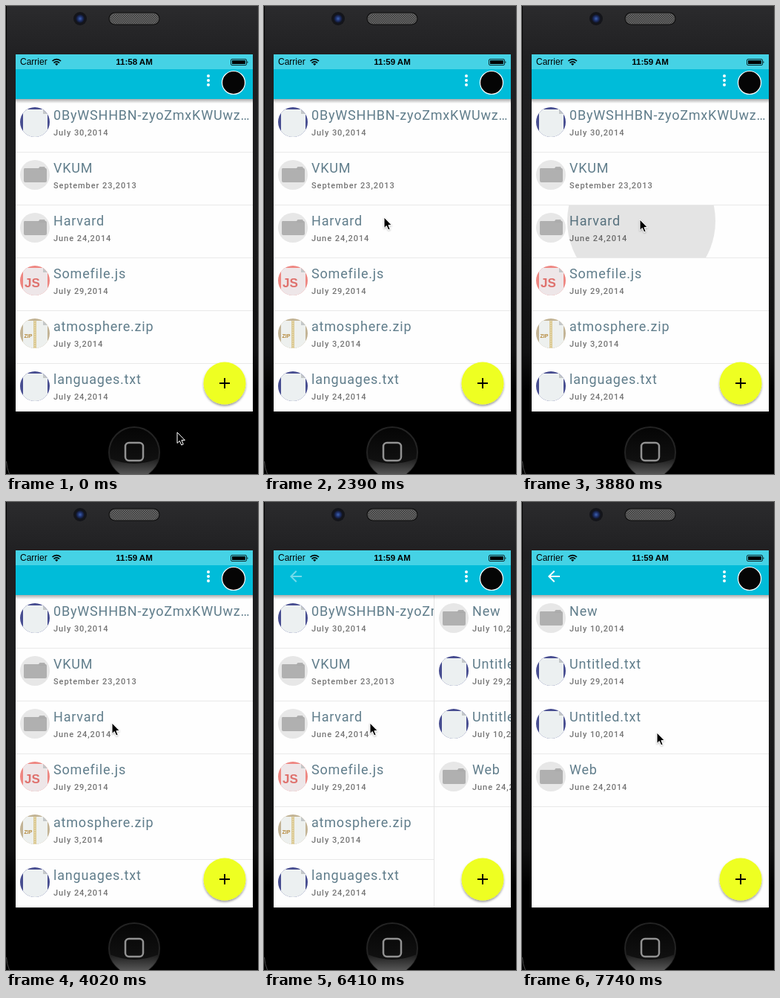
Animation of 340 by 629 pixels, one loop 8 s. Source, as an HTML page:

```html
<!DOCTYPE html>
<html lang="en">
<head>
<meta charset="utf-8">
<title>File browser</title>
<style>
  html, body { margin: 0; width: 100%; height: 100%; overflow: hidden; background: #000; }
  svg { display: block; width: 100%; height: 100%; }
  .status { font: 12px "Liberation Sans", Arial, sans-serif; }
  .clock { font-size: 11.5px; font-weight: 700; text-anchor: middle; }
  .title { font: 18px Roboto, sans-serif; letter-spacing: .8px; fill: #607d8b; }
  .date { font: 500 11px Roboto, sans-serif; letter-spacing: .95px; fill: #757575; }
  .badge { font-family: "Liberation Sans", Arial, sans-serif; font-weight: 700; }
</style>
</head>
<body>
<svg viewBox="0 0 340 629">
  <defs>
    <linearGradient id="body" x1="0" y1="0" x2="0" y2="1">
      <stop offset="0" stop-color="#2b2b2d"/>
      <stop offset=".11" stop-color="#202022"/>
      <stop offset=".5" stop-color="#1a1a1b"/>
      <stop offset=".74" stop-color="#101011"/>
      <stop offset=".82" stop-color="#000"/>
    </linearGradient>
    <linearGradient id="home" x1="0" y1="0" x2="0" y2="1">
      <stop offset="0" stop-color="#050505"/>
      <stop offset="1" stop-color="#161616"/>
    </linearGradient>
    <linearGradient id="gloss" x1="0" y1="0" x2="0" y2="1">
      <stop offset="0" stop-color="#1c1c1c"/>
      <stop offset="1" stop-color="#555"/>
    </linearGradient>
    <linearGradient id="drop" x1="0" y1="0" x2="0" y2="1">
      <stop offset="0" stop-color="#000" stop-opacity=".32"/>
      <stop offset="1" stop-color="#000" stop-opacity="0"/>
    </linearGradient>
    <radialGradient id="lens">
      <stop offset="0" stop-color="#3c62b4"/>
      <stop offset=".55" stop-color="#1d2d62"/>
      <stop offset="1" stop-color="#10131f"/>
    </radialGradient>
    <pattern id="mesh" width="3" height="3" patternUnits="userSpaceOnUse">
      <path fill="#777" d="M0 0h3v3H0z"/>
      <path fill="#303030" d="M0 0h1.5v1.5H0zM1.5 1.5H3V3H1.5z"/>
    </pattern>
    <filter id="soft" x="-30%" y="-30%" width="160%" height="160%">
      <feDropShadow dx="0" dy="2" stdDeviation="1.8" flood-opacity=".4"/>
    </filter>
    <filter id="lift" x="-50%" y="-50%" width="200%" height="200%">
      <feDropShadow dx="0" dy="1" stdDeviation=".8" flood-opacity=".3"/>
    </filter>
    <clipPath id="screen"><path d="M13 65h320v480H13z"/></clipPath>
    <clipPath id="disc"><circle r="20"/></clipPath>
    <clipPath id="thirdRow"><path d="M13 268h320v70H13z"/></clipPath>
  </defs>

  <path fill="url(#body)" d="M0 0h340v629H0z"/>
  <path fill="#000" d="M0 0h1v629H0z"/>
  <path fill="#000" d="M0 545h340v84H0z"/>
  <path fill="none" stroke="#4a4a4a" d="M.5 612q.5 9 4 17"/>

  <circle cx="100" cy="17" r="9" fill="#14151a"/>
  <circle cx="100" cy="17" r="6" fill="url(#lens)"/>
  <rect x="138.500" y="8.500" width="69" height="17" rx="8.500" fill="#0c0c0c"/>
  <rect x="140" y="10" width="66" height="14" rx="7" fill="url(#mesh)" stroke="#555"/>

  <circle cx="173" cy="600" r="34" fill="url(#home)" stroke="#232323" stroke-width="2"/>
  <path fill="url(#gloss)" d="M140 608Q173 622 206 608A34 34 0 0 1 194 627L192 629H154L152 627A34 34 0 0 1 140 608z"/>
  <rect x="161" y="587" width="24" height="24" rx="5" fill="none" stroke="#929292" stroke-width="2.500"/>

  <g clip-path="url(#screen)">
    <path fill="#fefefe" d="M13 65h320v480H13z"/>
    <g id="root"></g>
    <circle id="ripple" cx="161" cy="289" clip-path="url(#thirdRow)" opacity=".1"/>
    <g id="folder">
      <path fill="#fefefe" d="M13 125h320v420H13z"/>
      <path id="edge" fill="#e4e4e4" d="M12 125h1v420h-1z"/>
    </g>

    <path fill="url(#drop)" d="M13 125h320v6H13z"/>
    <path fill="#00bcd9" d="M13 85h320v40H13z"/>
    <path fill="#45d2e5" d="M13 65h320v20H13z"/>

    <text class="status" x="19" y="79">Carrier</text>
    <g fill="none" stroke="#000" stroke-width="1.700">
      <path d="M62.500 74a8 8 0 0 1 11.500 0M64.500 76.500a5 5 0 0 1 7.500 0"/>
      <path fill="#000" stroke="none" d="M66 77.800q2.200-1.600 4.400 0L68.200 80z"/>
    </g>
    <text id="clock" class="status clock" x="173" y="79"></text>
    <rect x="303.500" y="71.500" width="21" height="8" rx="1.500" fill="none" stroke="#000" stroke-width=".8"/>
    <path d="M305 73h18v5h-18zM325.500 74q2 1.500 0 3z"/>

    <path id="back" fill="#fff" transform="translate(31 88)" d="M20 11H7.830l5.590-5.590L12 4l-8 8 8 8 1.410-1.410L7.830 13H20z"/>
    <g fill="#fff">
      <circle cx="273" cy="94" r="2"/><circle cx="273" cy="100" r="2"/><circle cx="273" cy="106" r="2"/>
    </g>
    <circle cx="307" cy="103" r="15.500" fill="#050505" stroke="#fff" stroke-width="1.200"/>

    <circle cx="295" cy="507" r="28.500" fill="#eeff22" filter="url(#soft)"/>
    <path d="M294 500h2v6h6v2h-6v6h-2v-6h-6v-2h6z"/>
  </g>

  <path id="cursor" filter="url(#lift)" stroke="#fff" stroke-linejoin="round"
    d="M0 0V14.500L3.300 11.500L5.700 17L8.200 16L5.900 10.600H10.300z"/>
</svg>

<script>
const $ = id => document.getElementById(id);

const paper = (disc, sheet) => `
  <circle r="20" fill="${disc}"/>
  <g clip-path="url(#disc)">
    <path fill="${sheet}" d="M-16-17H11L17-11V21H-16z"/>
    <path fill="#c3c7c8" d="M11-17V-11H17z"/>
  </g>`;

const icons = {
  folder: `<circle r="20" fill="#e7e7e7"/>
    <path fill="#b0b0b0" d="M-14-9H5L6.500-11H13L14-9Q16-9 16-7V8Q16 10 14 10H-13Q-15 10-15 8V-7Q-15-9-14-9z"/>
    <path fill="none" stroke="#a2a2a2" stroke-width=".7" d="M5-8H15"/>`,
  txt: paper('#474d90', '#ecf0f1'),
  js: paper('#ee8681', '#eee6e8') +
    '<text class="badge" x="-14" y="9" font-size="17" fill="#df716d">JS</text>',
  zip: paper('#c2b394', '#edf0ee') +
    `<path fill="#dccb96" d="M-2-17H2V20H-2z"/>
     <path stroke="#f2ead0" stroke-dasharray="1 2" d="M0-17V20"/>
     <text class="badge" x="-14.500" y="6" font-size="7" fill="#b58a3c">ZIP</text>`
};

const row = ([icon, title, date], i) => `
  <g transform="translate(13 ${125 + 71 * i})">
    <g transform="translate(26 31)">${icons[icon]}</g>
    <text class="title" x="51" y="28">${title}</text>
    <text class="date" x="51" y="49">${date}</text>
    <path fill="#e9e9e9" d="M0 71h320v1H0z"/>
  </g>`;

const fill = (id, rows) => $(id).insertAdjacentHTML('beforeend', rows.map(row).join(''));

fill('root', [
  ['txt', '0ByWSHHBN-zyoZmxKWUwz…', 'July 30,2014'],
  ['folder', 'VKUM', 'September 23,2013'],
  ['folder', 'Harvard', 'June 24,2014'],
  ['js', 'Somefile.js', 'July 29,2014'],
  ['zip', 'atmosphere.zip', 'July 3,2014'],
  ['txt', 'languages.txt', 'July 24,2014']
]);
fill('folder', [
  ['folder', 'New', 'July 10,2014'],
  ['txt', 'Untitled.txt', 'July 29,2014'],
  ['txt', 'Untitled.txt', 'July 10,2014'],
  ['folder', 'Web', 'June 24,2014']
]);

// Each track starts at a time and holds one value per step.
const LOOP = 8000, STEP = 148.57;
const steps = (start, values) => values.map((v, i) => [Math.round(start + i * STEP), v]);
const at = (track, t) => track.reduce((held, [time, v]) => time <= t ? v : held, track[0][1]);

const cursorTrack = [
  [0, [231, 573]],
  ...steps(300, [[230, 562], [227, 530], [222, 484], [217, 440], [213, 408], [211, 388], [210, 378], [210, 374]]),
  ...steps(2090, [[204, 362], [186, 328], [162, 284], [142, 250], [133, 236], [140, 246], [152, 266], [159, 280]]),
  [3280, [159, 287]],
  [4020, [143, 297]],
  ...steps(7300, [[121, 305], [150, 312], [182, 310], [149, 304]])
];
const slideTrack = [[0, 321], ...steps(6120, [312, 217, 109, 46, 16, 2, 0, 0])];
const fadeTrack = [[0, 0], ...steps(6120, [.1, .45, .75, .92, 1])];
const rippleTrack = [[0, 0], [3730, 48], [3880, 100], [4020, 0]];

function draw(now) {
  const t = now % LOOP;
  const slide = at(slideTrack, t);
  $('cursor').setAttribute('transform', `translate(${at(cursorTrack, t)})`);
  $('folder').setAttribute('transform', `translate(${slide})`);
  $('edge').setAttribute('opacity', slide ? 1 : 0);
  $('back').setAttribute('opacity', at(fadeTrack, t));
  $('ripple').setAttribute('r', at(rippleTrack, t));
  $('clock').textContent = t < 750 ? '11:58 AM' : '11:59 AM';
  requestAnimationFrame(animate);
}

const start = performance.now();
function animate() { draw(performance.now() - start); }
animate();
</script>
</body>
</html>
```
